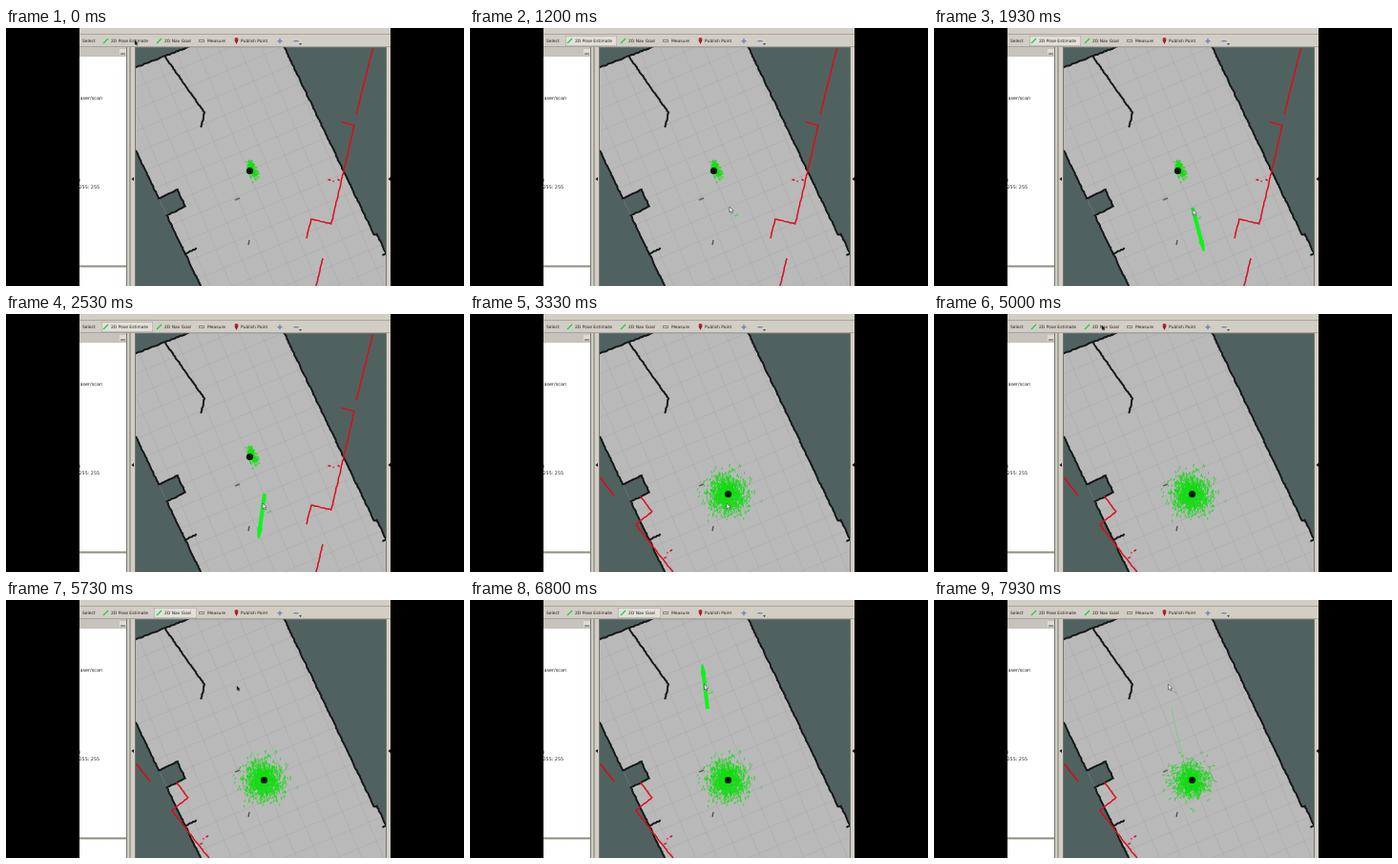
Recreate the animation shown at these times as an HTML page with a canvas. Size 480 by 270 pixels, loop 8000 ms.

```html
<!DOCTYPE html>
<html lang="en">
<head>
<meta charset="utf-8">
<title>Robot localisation</title>
<style>
html, body { margin: 0; width: 100%; height: 100%; overflow: hidden; background: #000; }
canvas { display: block; width: 100%; height: 100%; }
</style>
</head>
<body>
<canvas id="stage" width="480" height="270"></canvas>
<script>
const ctx = document.getElementById('stage').getContext('2d');
const LOOP = 8000, ROOM_TILT = -.447;
const TEAL = '#506260', FLOOR = '#b9b9b9', PANEL = '#d2cec5', EDGE = '#77746e';

const smooth = p => p * p * (3 - 2 * p);
const progress = (t, start, duration) => Math.min(1, Math.max(0, (t - start) / duration));

function rect(x, y, w, h, color) {
  ctx.fillStyle = color;
  ctx.fillRect(x, y, w, h);
}

function toPath(points) {
  const path = new Path2D();
  points.forEach(([x, y]) => path.lineTo(x, y));
  return path;
}

function stroke(path, color, width) {
  ctx.strokeStyle = color;
  ctx.lineWidth = width;
  ctx.stroke(path);
}

const line = (points, color, width) => stroke(toPath(points), color, width);

function shape(points, color) {
  ctx.fillStyle = color;
  ctx.fill(toPath(points));
}

function disc(x, y, r, color) {
  ctx.beginPath();
  ctx.arc(x, y, r, 0, 7);
  ctx.fillStyle = color;
  ctx.fill();
}

function label(text, x, y, size = 4.45, align = 'left') {
  ctx.font = size + 'px "DejaVu Sans", sans-serif';
  ctx.textAlign = align;
  ctx.fillStyle = '#222';
  ctx.fillText(text, x, y);
}

// Draws inside a moved, turned and optionally clipped coordinate system.
function inFrame(x, y, angle, paint) {
  ctx.save();
  ctx.translate(x, y);
  ctx.rotate(angle);
  paint();
  ctx.restore();
}

function clipped(x, y, w, h, paint) {
  ctx.save();
  ctx.beginPath();
  ctx.rect(x, y, w, h);
  ctx.clip();
  paint();
  ctx.restore();
}

let seed = 4711;
const random = () => (seed = seed * 16807 % 2147483647) / 2147483647;
const gauss = () => Math.sqrt(-2 * Math.log(random())) * Math.cos(2 * Math.PI * random());

// Polyline with the slightly ragged edge of sensor data.
function ragged(points, amount) {
  const result = [points[0]];
  for (let i = 1; i < points.length; i++) {
    const [x0, y0] = points[i - 1], [x1, y1] = points[i];
    const steps = Math.ceil(Math.hypot(x1 - x0, y1 - y0) / 2);
    for (let s = 1; s <= steps; s++) {
      result.push([x0 + (x1 - x0) * s / steps + (random() - .5) * amount,
                   y0 + (y1 - y0) * s / steps + (random() - .5) * amount]);
    }
  }
  return toPath(result);
}

// Gaussian cloud of short pose strokes around the robot.
function cloud(count, sx, sy, heading, spread, length) {
  const path = new Path2D();
  for (let i = 0; i < count; i++) {
    const x = gauss() * sx, y = gauss() * sy, a = heading + gauss() * spread;
    path.moveTo(x, y);
    path.lineTo(x + Math.cos(a) * length, y + Math.sin(a) * length);
  }
  return path;
}

const startCloud = cloud(190, 2.2, 4.4, 1.5, .5, 2.5);
const wideCloud = cloud(1250, 9.8, 10, 1.72, .28, 2.6);
const movingCloud = cloud(850, 9, 9, 2.1, .8, 3.4);

// Room coordinates: x across the room, y along its side walls.
const floor = [[0, -81], [187, -67], [187, 188], [190, 188], [190, 280], [0, 280]];
const walls = [
  [[0, -81], [115, -72.5]],
  [[70, -75], [82, -5], [72, 8]],
  [[187, -67], [187, 188], [190, 188], [190, 211], [186, 211]],
  [[0, 0], [0, 56], [21.5, 56], [21.5, 75.5], [0, 75.5], [0, 180]],
  [[0, 120], [13, 120]]
].map(points => ragged(points, .9));

// Robot coordinates: the same scan turns with the estimated pose.
const scan = [
  [[129, -128], [111.5, -59.5]],
  [[96, -51.5], [109.5, -47.5], [85.5, 55.5], [64.5, 50.5], [59.5, 70.5]],
  [[76.5, 91.5], [69.5, 121]],
  [[82, 9], [85, 10]],
  [[87, 11], [88, 11]],
  [[92, 9], [94, 10]]
].map(points => ragged(points, .7));

const cursorStart = [135, 13];
const cursorMoves = [
  { at: 350, duration: 600, to: [272, 187] },
  { at: 1700, duration: 700, to: [269, 198] },
  { at: 4400, duration: 600, to: [176, 12] },
  { at: 5300, duration: 350, to: [242, 90] },
  { at: 5900, duration: 250, to: [249, 114] },
  { at: 6200, duration: 400, to: [245.5, 88] }
];

function cursorAt(t) {
  return cursorMoves.reduce(([x, y], { at, duration, to }) => {
    const p = smooth(progress(t, at, duration));
    return [x + (to[0] - x) * p, y + (to[1] - y) * p];
  }, cursorStart);
}

function drawMap() {
  rect(136, 20, 262, 250, TEAL);
  inFrame(136, 128, ROOM_TILT, () => {
    shape(floor, FLOOR);
    rect(0, 56, 21.5, 19.5, TEAL);
    walls.forEach(wall => stroke(wall, '#141818', 2));
  });
  inFrame(270, 188, -.4, () => {
    for (let d = -294; d <= 294; d += 21) {
      line([[d, -300], [d, 300]], 'rgba(90,90,90,.1)', .8);
      line([[-300, d], [300, d]], 'rgba(90,90,90,.1)', .8);
    }
  });
  line([[240, 180], [245, 178]], '#666', 1.8);
  line([[255, 222], [254, 227]], '#555', 1.4);
}

function drawRobot(t) {
  const moved = t >= 2870;
  const particles = !moved ? startCloud : t < 7870 ? wideCloud : movingCloud;
  const [x, y] = moved ? [270.5, 188.5] : [255.5, 149.5];
  inFrame(x, y, moved ? 2.25 : 0, () => scan.forEach(part => stroke(part, '#dc0b1c', 1.5)));
  if (moved) inFrame(x - .5, y - 1, 0, () => stroke(particles, '#12dc12', .75));
  else inFrame(x + 1.5, y - 3, -.45, () => stroke(particles, '#12e012', .9));
  disc(x, y, 3.6, '#0b180b');
}

function drawArrow(x, y, [cursorX, cursorY]) {
  inFrame(x, y, Math.atan2(cursorY + 1 - y, cursorX + .5 - x), () => {
    rect(0, -2, 38, 4, '#0cf51a');
    shape([[36, -2.8], [47, -1], [47, 1], [36, 2.8]], '#0cf51a');
  });
}

function drawButton(x, w) {
  rect(x, 8, w, 11, '#aaa69d');
  rect(x + .6, 8.6, w - 1.2, 9.8, '#e3e0d9');
}

function drawToolbar(t) {
  rect(77, 0, 326, 20, PANEL);
  rect(77, 6, 326, 1, '#aaa69f');
  rect(77, 19.3, 326, 1, '#96938d');
  if (t > 400 && t < 2600) drawButton(100, 54);
  if (t > 5150 && t < 6930) drawButton(155, 45);

  label('Select', 80, 15);
  label('2D Pose Estimate', 110, 15);
  label('2D Nav Goal', 166, 15);
  label('Measure', 211, 15);
  label('Publish Point', 246, 15);
  for (const x of [102, 158]) line([[x, 16], [x + 5, 11]], '#2cc83a', 1.2);
  rect(202, 12, 6, 3, '#888');
  rect(203, 13, 4, 1, '#d8d4bc');
  disc(241.5, 12, 2, '#b52630');
  shape([[239.7, 13], [243.3, 13], [241.5, 17]], '#8f1820');
  for (const x of [284.5, 301.5]) rect(x, 13, 5, 1.4, '#6a86b0');
  rect(286.3, 11.2, 1.4, 5, '#6a86b0');
  shape([[307, 16], [310, 16], [308.5, 18]], '#444');
}

function drawPanels() {
  rect(77, 20, 59, 250, PANEL);
  rect(77, 20, 49, 10, '#c6c3bc');
  rect(77, 30, 49, 219, '#fff');
  rect(77, 248.5, 49, 1.2, EDGE);
  rect(77, 251, 49, 19, '#fff');
  for (const x of [126, 129.5, 135]) rect(x, 20, 1, 250, EDGE);
  rect(398, 20, 5, 250, PANEL);
  rect(398, 20, 1, 250, EDGE);
  rect(119, 22, 7, 6, '#dedbd5');
  rect(120, 26.5, 5, 1, '#555');
  for (const x of [132, 401]) shape([[x + 2, 156], [x + 2, 160], [x - .5, 158]], '#111');

  clipped(77, 30, 49, 218, () => {
    label('laser/scan', 101, 75, 4.9, 'right');
    label('0', 78, 161, 4.8, 'right');
    label('255; 255: 255', 98, 168, 4.8, 'right');
  });
}

function drawCursor(t, [x, y]) {
  const dark = t < 700 || t > 4400 && t < 6000;
  const armed = t > 850 && t < 2600 || t > 6000 && t < 6930;
  if (armed) line([[x + 5, y + 10], [x + 9, y + 8]], '#38dc45', 1.2);
  if (t > 7000) line([[x + 5, y + 7], [x + 9, y + 10]], '#999', 1);
  inFrame(x, y, 0, () => {
    if (dark) ctx.scale(.75, .75);
    const pointer = [[0, 0], [0, 6], [1.4, 4.8], [2.5, 7], [3.5, 6.5], [2.5, 4.4], [4.3, 4.2], [0, 0]];
    shape(pointer, dark ? '#111' : '#f4f4f4');
    line(pointer, '#444', .6);
  });
}

function draw(t) {
  const cursor = cursorAt(t);
  rect(0, 0, 480, 270, '#000');
  clipped(136, 20, 262, 250, () => {
    drawMap();
    if (t > 7200) line([[249, 113], [254, 138], [262, 167]], 'rgba(80,225,80,.65)', .8);
    drawRobot(t);
    if (t > 1750 && t < 2670) drawArrow(271, 188, cursor);
    if (t > 6250 && t < 7000) drawArrow(249, 114, cursor);
  });
  drawToolbar(t);
  drawPanels();
  drawCursor(t, cursor);
}

function frame() {
  draw(performance.now() % LOOP);
  requestAnimationFrame(frame);
}
frame();
</script>
</body>
</html>
```
